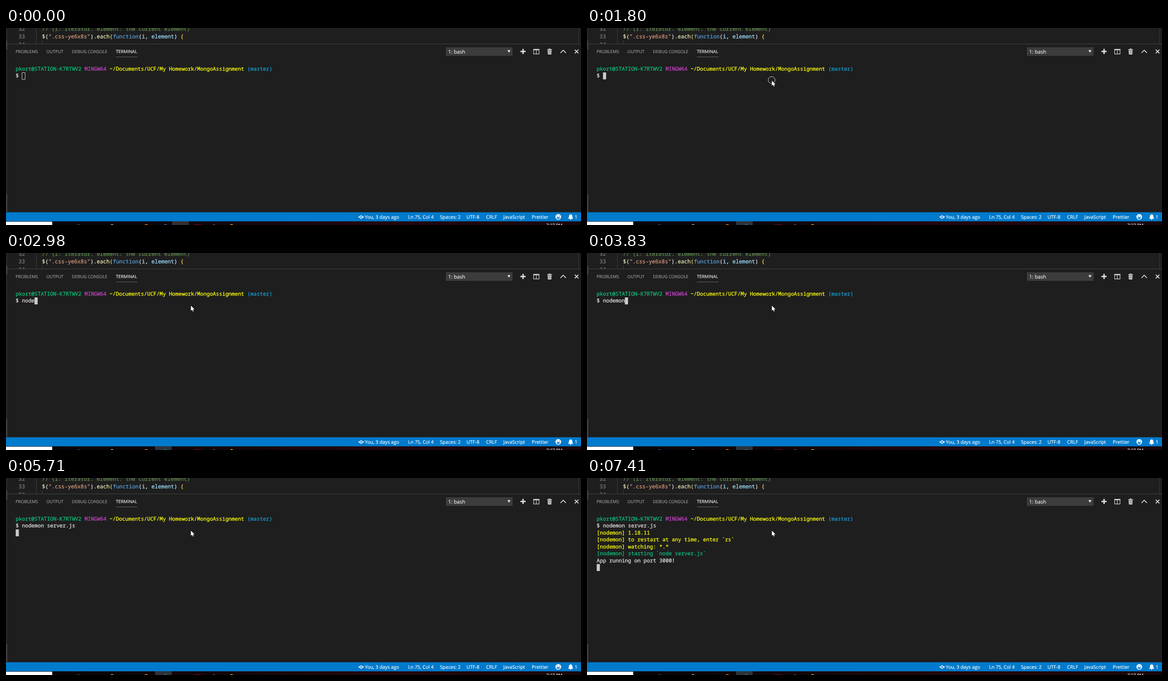
Write an HTML page with a canvas that moves like this. It is 1277 by 439 pixels and loops after 8 s.

```html
<!DOCTYPE html>
<html lang="en">
<head>
<meta charset="utf-8">
<title>Terminal session</title>
<style>
html, body { margin: 0; width: 100%; height: 100%; overflow: hidden; background: #1e1e1e; }
canvas { display: block; width: 1277px; height: 439px; }
</style>
</head>
<body>
<canvas id="stage" width="1277" height="439"></canvas>
<script>
const ctx = document.getElementById('stage').getContext('2d');
const W = 1277, H = 439, LOOP = 8000;
const MONO = '"Noto Sans Mono", "DejaVu Sans Mono", monospace';
const UI = '"Open Sans", "Noto Sans", sans-serif';
const BG = '#1e1e1e', FG = '#e4e4e4', BLOCK = '#cccccc', YELLOW = '#ffff10', GREEN = '#0dc07c';

// Terminal grid
const COL = 6.95, ROW = 15.45, LEFT = 21.6, TOP = 83.6;
const COMMAND = 'nodemon server.js ';

// [time, characters typed]
const KEYS = [[2670, 1], [2740, 2], [2810, 3], [2980, 4], [3530, 5], [3600, 6],
  [3830, 7], [4000, 8], [4300, 9], [4550, 10], [4620, 11], [4780, 18]];
// [time, x, y] of the pointer tip
const POINTER = [[650, 1005, 371], [730, 762, 267], [820, 634, 213],
  [1120, 592, 196], [1200, 520, 166], [1270, 458, 140], [1350, 427.5, 127],
  [1430, 415, 119], [1510, 410, 116]];
const CLICK = 1740, FOCUS = 1800, RELEASE = 1970;
const ENTER = 5710, OUTPUT = 6400, READY = 7410;

const latest = (steps, t) => steps.filter(s => s[0] <= t).pop();

function rect(x, y, w, h, color) {
  ctx.fillStyle = color;
  ctx.fillRect(x, y, w, h);
}

function disc(x, y, r, color) {
  ctx.fillStyle = color;
  ctx.beginPath();
  ctx.arc(x, y, r, 0, Math.PI * 2);
  ctx.fill();
}

function ring(x, y, r, color, width) {
  ctx.strokeStyle = color;
  ctx.lineWidth = width;
  ctx.beginPath();
  ctx.arc(x, y, r, 0, Math.PI * 2);
  ctx.stroke();
}

function trace(points) {
  ctx.beginPath();
  points.forEach(([x, y]) => ctx.lineTo(x, y));
}

function line(points, color, width) {
  trace(points);
  ctx.strokeStyle = color;
  ctx.lineWidth = width;
  ctx.stroke();
}

function shape(points, color) {
  trace(points);
  ctx.closePath();
  ctx.fillStyle = color;
  ctx.fill();
}

// A thin outline gives the slightly heavier screen weight
function text(str, x, y, size, color, family = UI, weight = 0.2) {
  ctx.font = size + 'px ' + family;
  ctx.fillStyle = ctx.strokeStyle = color;
  ctx.lineWidth = weight;
  ctx.lineJoin = 'round';
  ctx.fillText(str, x, y);
  ctx.strokeText(str, x, y);
}

// Coloured runs placed one after another on a character grid
function runs(list, x, y, step, size) {
  for (const [str, color] of list) {
    text(str, x, y, size, color, MONO, 0.3);
    x += str.length * step;
  }
}

function termLine(row, ...list) {
  runs(list, LEFT, TOP + row * ROW + 11.4, COL, 11.58);
}

function codeLine(y, list) {
  runs(list, 80, y, 7.15, 11.92);
}

function editor() {
  ctx.save();
  ctx.beginPath();
  ctx.rect(0, 0, W, 35);
  ctx.clip();
  [32, 33, 34].forEach((n, i) => text(n, 27.8, 5.8 + i * 17.4, 11.92, '#858585', MONO));
  rect(67, 0, 1, 35, '#404040');
  rect(80, 28, 1, 7, '#404040');
  codeLine(5.8, [['// (i: iterator. element: the current element)', '#608b4e']]);
  codeLine(23.2, [
    ['$', '#e6e6b4'], ['(', '#e4e4e4'], ['".css-ye6x8s"', '#d6987c'], [').', '#e4e4e4'],
    ['each', '#e6e6b4'], ['(', '#f0d75a'], ['function', '#569cd6'], ['(', '#e4e4e4'],
    ['i', '#9cdcfe'], [', ', '#e4e4e4'], ['element', '#9cdcfe'], [') ', '#e4e4e4'], ['{', '#f8d640']
  ]);
  rect(1271, 0, 1, 35, '#383838');
  ctx.restore();
  rect(0, 0, 3, 410, '#252526');
  rect(0, 28, 3, 20, '#404041');
  rect(0, 370, 3, 40, '#404041');
  rect(3, 35, W - 3, 1, '#474747');
}

function panelBar() {
  const dim = '#9b9b9b', lit = '#eeeeee', icon = '#dddddd';
  text('PROBLEMS', 21.3, 55.6, 9.65, dim);
  text('OUTPUT', 89.6, 55.6, 9.65, dim);
  text('DEBUG CONSOLE', 146.3, 55.6, 9.65, dim);
  text('TERMINAL', 244, 55.6, 9.85, lit);
  rect(244, 64, 48, 1, '#6a6a6a');

  rect(977, 43, 148, 19, '#3c3c3c');
  text('1: bash', 982, 57, 11.3, '#f0f0f0');
  shape([[1113.6, 49.4], [1120.4, 49.4], [1117, 54.8]], '#f0f0f0');

  rect(1142.5, 50.8, 11.5, 3, icon);
  rect(1146.8, 46.5, 3, 11.5, icon);

  ctx.strokeStyle = icon;
  ctx.lineWidth = 1.2;
  ctx.strokeRect(1171.8, 47.5, 12, 10.4);
  rect(1171.2, 46.8, 13.2, 2.6, icon);
  rect(1177.2, 48, 1.2, 10, icon);

  rect(1202, 47.4, 10.5, 1.7, icon);
  rect(1205, 46, 4.5, 1.6, icon);
  shape([[1203, 50], [1211.6, 50], [1211, 59], [1203.6, 59]], icon);
  [1205, 1207, 1209].forEach(x => rect(x, 51.2, 0.8, 6.2, '#555555'));

  line([[1231.5, 55.6], [1237.5, 49.4], [1243.5, 55.6]], icon, 1.7);
  line([[1263.2, 48.4], [1271.2, 56.4]], icon, 2);
  line([[1271.2, 48.4], [1263.2, 56.4]], icon, 2);
}

function statusBar() {
  const blue = '#007acc', white = '#ffffff';
  rect(0, 410.6, W, 20.2, blue);
  line([[782.5, 421.2], [785.5, 421.2]], white, 1.7);
  line([[791.5, 421.2], [795, 421.2]], white, 1.7);
  ring(788.6, 421.2, 2.7, white, 1.6);
  [['You, 3 days ago', 797], ['Ln 75, Col 4', 893], ['Spaces: 2', 963.8], ['UTF-8', 1022.8],
   ['CRLF', 1066.3], ['JavaScript', 1104.6], ['Prettier', 1167.8], ['1', 1263]]
    .forEach(([label, x]) => text(label, x, 425.1, 10.6, white));

  disc(1226.5, 421, 6.2, white);
  disc(1224.3, 419.2, 1.05, blue);
  disc(1228.7, 419.2, 1.05, blue);
  ctx.fillStyle = blue;
  ctx.beginPath();
  ctx.arc(1226.5, 421.8, 3.7, 0, Math.PI);
  ctx.fill();

  ctx.fillStyle = white;
  ctx.beginPath();
  ctx.moveTo(1248, 425);
  ctx.quadraticCurveTo(1250.3, 423, 1250.3, 419.5);
  ctx.quadraticCurveTo(1250.5, 415.6, 1254, 415.2);
  ctx.quadraticCurveTo(1257.5, 415.6, 1257.7, 419.5);
  ctx.quadraticCurveTo(1257.7, 423, 1260, 425);
  ctx.fill();
  disc(1254, 425.6, 1.7, white);
}

function taskBar(focused) {
  const shade = ctx.createLinearGradient(103, 0, W, 0);
  shade.addColorStop(0, '#080406');
  shade.addColorStop(0.35, '#12060a');
  shade.addColorStop(0.6, '#23070d');
  shade.addColorStop(1, '#19060a');
  rect(0, 430, W, 9, shade);
  rect(0, 431.6, 102.6, 8, '#ffffff');
  rect(focused ? 331 : 369, 431, 37, 8, focused ? '#2f3338' : '#34302f');
  disc(161, 443, 6, '#183a66');
  ring(235.5, 440.5, 2.8, '#c0c0c0', 1.2);
  disc(311.5, 443, 6, '#c86a24');
  disc(354, 442, 5, '#20649c');
  rect(417, 437, 16, 2, '#4c0a18');
  disc(462, 441, 3.5, '#9c5a20');
  disc(501, 441, 4, '#d08a38');
  text('7:27 PM', 1200, 442.6, 9.6, '#f0f0f0');
}

function cursor(col, row, solid) {
  const x = LEFT + col * COL, y = TOP + row * ROW;
  if (solid) return rect(x, y, COL, ROW, BLOCK);
  ctx.strokeStyle = BLOCK;
  ctx.lineWidth = 1;
  ctx.strokeRect(Math.round(x) - 0.5, Math.round(y) + 0.5, 7, 15);
}

function terminal(t) {
  termLine(0, ['pkort@STATION-K7RTWV2 ', GREEN], ['MINGW64 ', '#c644c6'],
    ['~/Documents/UCF/My Homework/MongoAssignment ', YELLOW], ['(master)', '#149fd6']);
  const typed = (latest(KEYS, t) || [0, 0])[1];
  termLine(1, ['$ ' + COMMAND.slice(0, typed), FG]);
  if (t >= OUTPUT) {
    termLine(2, ['[nodemon] 1.18.11', YELLOW]);
    termLine(3, ['[nodemon] to restart at any time, enter `rs`', YELLOW]);
    termLine(4, ['[nodemon] watching: *.*', YELLOW]);
    termLine(5, ['[nodemon] starting `node server.js`', GREEN]);
  }
  if (t >= READY) termLine(6, ['App running on port 3000!', FG]);

  if (t < ENTER) cursor(2 + typed, 1, t >= FOCUS);
  else cursor(0, t >= READY ? 7 : t >= OUTPUT ? 6 : 2, true);
}

function pointer(t) {
  const spot = latest(POINTER, t);
  if (!spot) return;
  const [, x, y] = spot;
  if (t >= CLICK && t < RELEASE) {
    ring(x, y, 8.6, '#000000', 0.9);
    ring(x, y, 7.8, '#ffffff', 0.9);
  }
  const arrow = [[0.6, 1.2], [0.6, 12.8], [3.2, 10.4], [5, 14.4], [6.8, 13.6], [5.1, 9.7], [8.7, 9.5]]
    .map(([dx, dy]) => [x + dx, y + dy]);
  line([...arrow, arrow[0]], '#000000', 1.2);
  shape(arrow, '#ffffff');
}

function draw(t) {
  rect(0, 0, W, H, BG);
  editor();
  panelBar();
  terminal(t);
  taskBar(t >= FOCUS);
  statusBar();
  pointer(t);
}

ctx.textRendering = 'geometricPrecision';
const start = performance.now();
function tick() {
  draw((performance.now() - start) % LOOP);
  requestAnimationFrame(tick);
}
tick();
</script>
</body>
</html>
```
